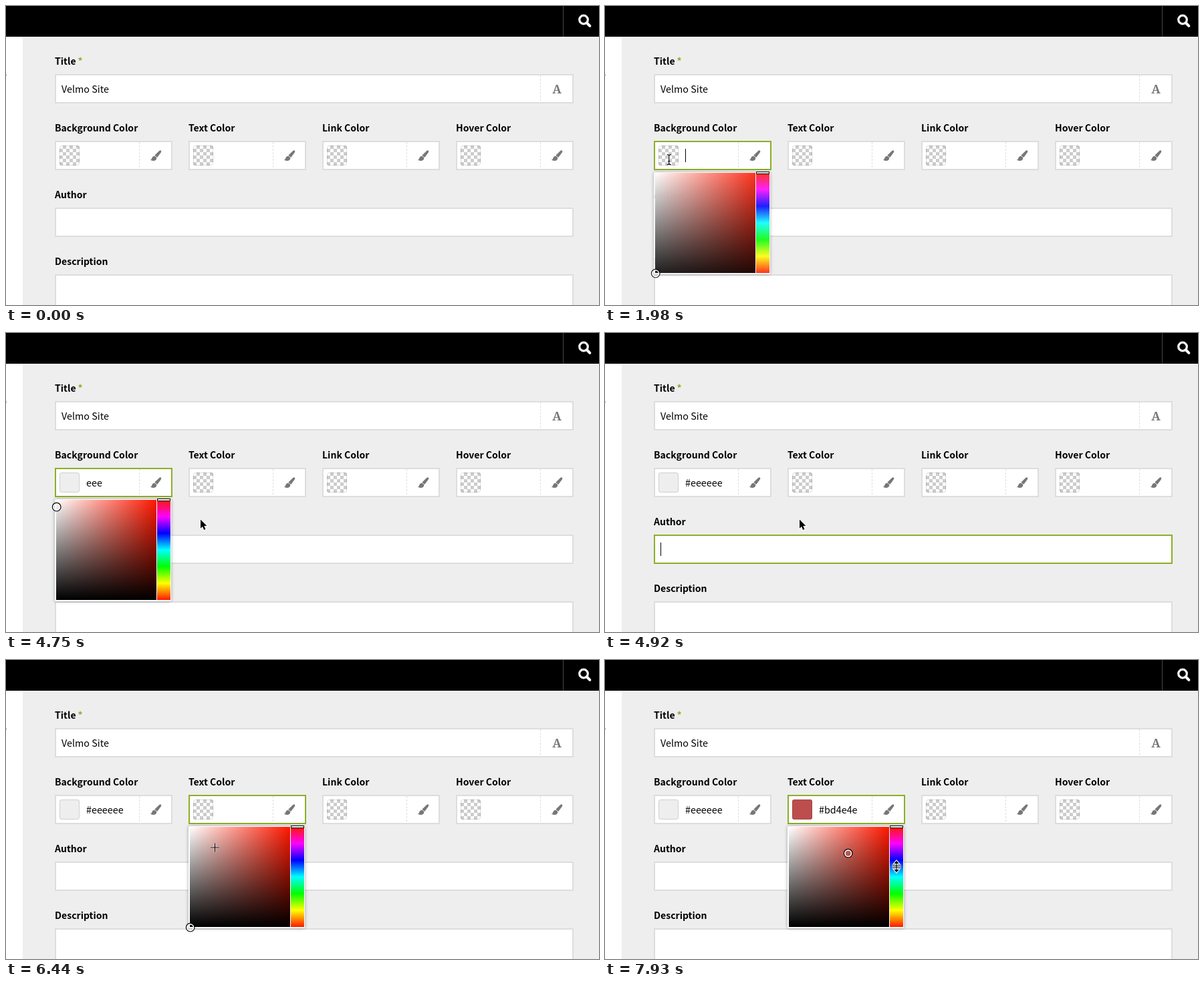
An HTML page with a canvas that plays this animation: 887 px wide and 448 px high, repeating every 8000 ms.

```html
<!DOCTYPE html>
<html lang="en">
<head>
<meta charset="utf-8">
<title>Color fields</title>
<style>
  html, body { margin: 0; width: 100%; height: 100%; overflow: hidden; }
  canvas { display: block; }
</style>
</head>
<body>
<canvas id="stage" width="887" height="448"></canvas>
<script>
const ctx = document.getElementById('stage').getContext('2d');
const LOOP = 8000, TICK = 90;
const SANS = '"Noto Sans CJK SC", "Noto Sans CJK JP", "Noto Sans CJK", "Open Sans", sans-serif';
const REGULAR = '14.35px ' + SANS, BOLD = 'bold 14.05px ' + SANS;
const GREEN = '#8dae28', LINE = '#ddd', ICON = '#777', RED = '#ff1800';
const LABELS = ['Background Color', 'Text Color', 'Link Color', 'Hover Color'];

// Pointer track: time, x, y
const TRACK = [
  [1170, 48, 268], [1710, 93, 230], [1890, 93, 230], [2430, 130, 232],
  [2610, 130, 232], [2790, 137, 233], [3060, 137, 233], [3150, 139.5, 234],
  [3780, 154, 238], [4050, 154, 238], [4680, 291, 279.5], [5130, 291, 279.5],
  [5760, 312, 228], [5940, 312, 228], [6390, 312.5, 281], [6750, 328, 297],
  [6840, 328, 297], [7380, 363, 289], [7560, 386, 297], [7650, 386, 297],
  [7920, 436, 309.5]
];
const DRAG_START = 6890, DRAG_END = 7380;

const ramp = (t, a, b) => Math.min(1, Math.max(0, (t - a) / (b - a)));
const smooth = k => k * k * (3 - 2 * k);
const mix = (a, b, k) => a + (b - a) * k;
const within = (t, ...spans) => spans.some(([a, b]) => t >= a && t < b);

function pointerAt(t) {
  let i = 1;
  while (i < TRACK.length - 1 && TRACK[i][0] < t) i++;
  const [t0, x0, y0] = TRACK[i - 1], [t1, x1, y1] = TRACK[i];
  const k = smooth(ramp(t, t0, t1));
  return { x: mix(x0, x1, k), y: mix(y0, y1, k) };
}

function rect(x, y, w, h, color) {
  ctx.fillStyle = color;
  ctx.fillRect(x, y, w, h);
}

function text(str, x, y, font = REGULAR, color = '#000', align = 'left') {
  ctx.font = font;
  ctx.fillStyle = color;
  ctx.textAlign = align;
  ctx.fillText(str, x, y);
}

function field(x, y, w, focused) {
  rect(x, y, w, 44, focused ? GREEN : LINE);
  rect(x + 2, y + 2, w - 4, 40, '#fff');
}

function divider(x, y) {
  for (let d = 0; d < 40; d += 5) rect(x, y + d, 1, 3, LINE);
}

const BRUSH = new Path2D('M15.7.4Q17.2 1.7 15.6 3.8L10.2 11 6.3 7.8 13.2 1Q14.7-.3 15.7.4Z' +
  'M5.5 8.7Q9 9.6 9.3 12.2 8.7 16 4.2 16 1.7 16-.2 14.2 1.8 14.4 2.2 12 3 9 5.5 8.7Z');

function swatch(x, y, color) {
  ctx.save();
  ctx.beginPath();
  ctx.roundRect(x, y, 30, 30, 3);
  ctx.clip();
  rect(x, y, 30, 30, color || '#fff');
  if (!color)
    for (let i = 0; i < 36; i++)
      if ((i + (i / 6 | 0)) % 2) rect(x + i % 6 * 5, y + (i / 6 | 0) * 5, 5, 5, '#ccc');
  ctx.restore();
  ctx.strokeStyle = 'rgba(0,0,0,.13)';
  ctx.lineWidth = 1;
  ctx.beginPath();
  ctx.roundRect(x + .5, y + .5, 29, 29, 3);
  ctx.stroke();
}

function colorField(x, { value, color, focused, caret }) {
  field(x, 202, 176, focused);
  divider(x + 126, 204);
  swatch(x + 7, 209, color);
  text(value, x + 47, 230);
  if (caret) rect(Math.round(x + 47 + ctx.measureText(value).width), 214, 1, 20, '#000');
  ctx.save();
  ctx.translate(x + 143, 216);
  ctx.fillStyle = ICON;
  ctx.fill(BRUSH);
  ctx.restore();
}

function gradient(x0, y0, x1, y1, stops) {
  const g = ctx.createLinearGradient(x0, y0, x1, y1);
  stops.forEach((c, i) => g.addColorStop(i / (stops.length - 1), c));
  return g;
}

function ring(x, y, r, color, width) {
  ctx.strokeStyle = color;
  ctx.lineWidth = width;
  ctx.beginPath();
  ctx.arc(x, y, r, 0, 7);
  ctx.stroke();
}

// Saturation/brightness square with hue strip; marker is relative to the square
function picker(x, alpha, marker) {
  if (!alpha) return;
  ctx.save();
  ctx.globalAlpha = alpha;
  ctx.save();
  ctx.shadowColor = 'rgba(0,0,0,.35)';
  ctx.shadowBlur = 5;
  ctx.fillStyle = '#fff';
  ctx.beginPath();
  ctx.roundRect(x, 249, 174, 153, 2);
  ctx.fill();
  ctx.restore();
  const left = x + 2;
  rect(left, 250, 150, 150, gradient(left, 0, left + 150, 0, ['#fff', RED]));
  rect(left, 250, 150, 150, gradient(0, 250, 0, 400, ['rgba(0,0,0,0)', '#000']));
  rect(left + 151, 250, 20, 150,
    gradient(0, 250, 0, 400, [RED, '#f0f', '#00f', '#0ff', '#0f0', '#ff0', RED]));
  rect(left + 151, 248, 20, 4, '#000');
  rect(left + 152, 249, 18, 2, '#fff');
  const mx = left + marker.x + .7, my = 250 + marker.y + .7;
  ring(mx, my, 5, '#fff', 2);
  ring(mx, my, 6.3, '#000', 1.2);
  ctx.restore();
}

const SHAPES = {
  arrow: new Path2D('M0 0V13.3L3 10.4 5.2 15.5 7.5 14.5 5.3 9.5H9.4Z'),
  beam: new Path2D('M-3-7.5Q0-7.5 0-5.5Q0-7.5 3-7.5M0-6V6M-3 7.5Q0 7.5 0 5.5Q0 7.5 3 7.5M-1.5 2.5H1.5'),
  cross: new Path2D('M-6.5 0H6.5M0-6.5V6.5'),
  row: new Path2D('M-7-1.2H7M-7 1.2H7M0-7V7M-2.5-5L0-8 2.5-5ZM-2.5 5L0 8 2.5 5Z')
};

function pointer({ x, y }, pickerX) {
  let kind = 'arrow';
  if (y > 204 && y < 244 && x > 75 && (x - 73) % 200 < 174) kind = 'beam';
  else if (pickerX && y >= 250 && y < 400) {
    if (x >= pickerX + 2 && x < pickerX + 152) kind = 'cross';
    else if (x >= pickerX + 153 && x < pickerX + 173) kind = 'row';
  }
  const shape = SHAPES[kind], solid = kind === 'arrow' || kind === 'row';
  ctx.save();
  ctx.translate(x, y);
  ctx.strokeStyle = '#fff';
  ctx.lineWidth = kind === 'arrow' ? 2 : kind === 'row' ? 3.2 : 2.4;
  ctx.globalAlpha = solid ? 1 : .65;
  ctx.stroke(shape);
  ctx.globalAlpha = 1;
  ctx.fillStyle = ctx.strokeStyle = '#000';
  ctx.lineWidth = 1.1;
  if (solid) ctx.fill(shape);
  if (kind !== 'arrow') ctx.stroke(shape);
  ctx.restore();
}

function hexAt({ x, y }) {
  const v = Math.round((1 - y / 150) * 255), s = Math.round(x / 150 * 255);
  const hex = n => Math.round(n).toString(16).padStart(2, '0');
  const low = hex((255 - s) * v / 255);
  return '#' + hex(v) + low + low;
}

function page() {
  rect(0, 0, 887, 448, '#fff');
  rect(25, 46, 862, 402, '#eee');
  rect(0, 0, 887, 46, '#000');
  rect(833, 0, 1, 46, '#444');
  rect(0, 102, 1, 3, '#bbb');
  ring(864, 20.5, 6.3, '#fff', 3.2);
  ctx.lineWidth = 4;
  ctx.lineCap = 'round';
  ctx.beginPath();
  ctx.moveTo(869.5, 26);
  ctx.lineTo(873.3, 29.8);
  ctx.stroke();
  ctx.lineCap = 'butt';

  text('Title', 73, 88, BOLD);
  text('*', 107.5, 88, BOLD, GREEN);
  field(73, 102, 776);
  text('Velmo Site', 83, 130);
  divider(799, 104);
  text('A', 824, 131, 'bold 18px "Noto Serif", serif', ICON, 'center');
  LABELS.forEach((label, i) => text(label, 73 + i * 200, 188, BOLD));
  text('Author', 73, 288, BOLD);
  text('Description', 73, 388, BOLD);
  rect(73, 402, 776, 46, LINE);
  rect(75, 404, 772, 44, '#fff');
}

function draw(t) {
  const tick = Math.floor(t / TICK) * TICK;
  const dragged = t >= DRAG_START;
  const grip = pointerAt(Math.min(tick, DRAG_END));
  const picked = dragged ? { x: grip.x - 275, y: grip.y - 250 } : { x: 0, y: 150 };
  const pickedHex = dragged ? hexAt(picked) : '';
  const typed = t < 4830 ? 'eee'.slice(0, (t >= 3140) + (t >= 3410) + (t >= 3680)) : '#eeeeee';

  page();
  field(73, 302, 776, within(t, [4920, 6000]));
  if (within(t, [4920, 5460])) rect(83, 314, 1, 20, '#000');
  colorField(73, {
    value: typed, color: t >= 3680 && '#eee', focused: within(t, [1790, 4830]),
    caret: within(t, [1890, 2420], [2960, 4300])
  });
  colorField(273, {
    value: pickedHex, color: pickedHex, focused: t >= 5900,
    caret: within(t, [5910, 6430], [7250, 7800])
  });
  [473, 673].forEach(x => colorField(x, { value: '' }));

  const first = ramp(t, 1850, 2000) * (1 - ramp(t, 4790, 4900));
  const second = ramp(t, 5880, 6040);
  picker(73, first, { x: 0, y: mix(150, 10, smooth(ramp(t, 3690, 3830))) });
  picker(273, second, picked);
  if (tick >= 1170) pointer(pointerAt(tick), first ? 73 : second ? 273 : 0);
}

function frame() {
  draw(performance.now() % LOOP);
  requestAnimationFrame(frame);
}
frame();
</script>
</body>
</html>
```
